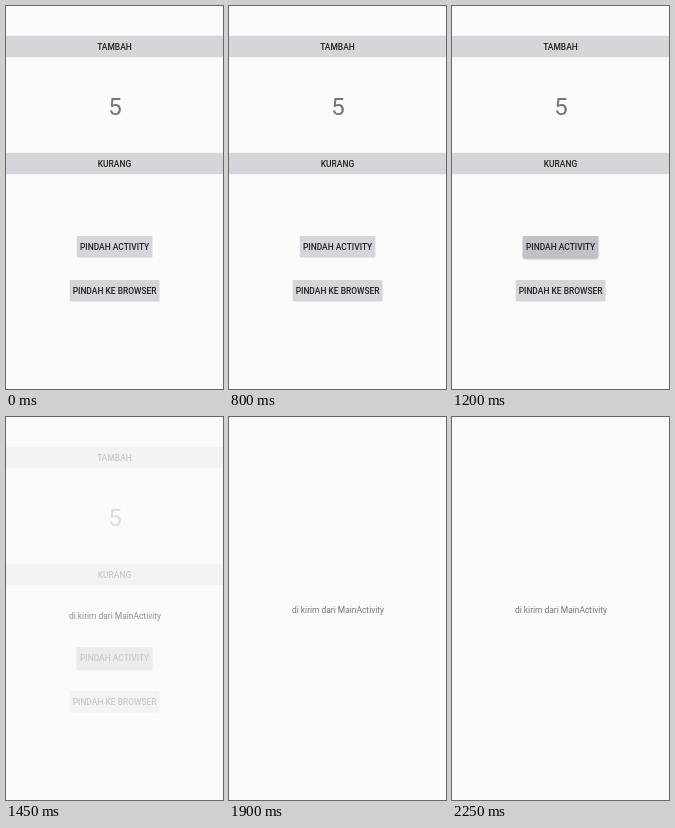
An HTML page for the animation above (2300 ms loop, 217 by 383 pixels).

```html
<!DOCTYPE html>
<html lang="id">
<head>
<meta charset="utf-8">
<title>Counter app</title>
<style>
  html, body { margin: 0; width: 100%; height: 100%; overflow: hidden; background: #fbfbfc; }
  svg { display: block; width: 100vw; height: 100vh; }
  text { font-family: Roboto, "Noto Sans", sans-serif; font-size: 8.44px; text-anchor: middle; fill: #757575; }
  .button rect { fill: #d6d6da; }
  .button text { font-weight: 500; fill: #202020; }
  .count { font-size: 24px; }
</style>
</head>
<body>
<svg viewBox="0 0 217 383">
  <defs>
    <filter id="soft" x="-20%" y="-40%" width="140%" height="200%">
      <feGaussianBlur stdDeviation="1.3"/>
    </filter>
  </defs>
  <rect width="217" height="383" fill="#fbfbfc"/>
  <g id="buttons"></g>
  <text class="count" x="109" y="109">5</text>
  <g id="next" opacity="0">
    <rect width="217" height="383" fill="#fbfbfc"/>
    <text x="109" y="195.8">di kirim dari MainActivity</text>
  </g>
</svg>
<script>
const LOOP = 2300, TICK = 50;
const PRESS = [1100, 1250];
const OPEN = [1350, 1600];
const NS = "http://www.w3.org/2000/svg";

function add(parent, tag, attrs, label) {
  const el = document.createElementNS(NS, tag);
  for (const key in attrs) el.setAttribute(key, attrs[key]);
  if (label) el.textContent = label;
  return parent.appendChild(el);
}

const buttons = document.getElementById("buttons");
const next = document.getElementById("next");
const shadow = add(buttons, "rect", {
  x: 71, y: 232, width: 75, height: 21, rx: 1.2,
  fill: "#000", opacity: 0, filter: "url(#soft)"
});

function button(label, x, y, width) {
  const g = add(buttons, "g", { class: "button" });
  const face = add(g, "rect", { x, y, width, height: 21.5, rx: 1.2 });
  add(g, "text", { x: x + width / 2, y: y + 13.7 }, label);
  return face;
}

button("TAMBAH", 0, 29.8, 217);
button("KURANG", 0, 146.8, 217);
const pressed = button("PINDAH ACTIVITY", 70.8, 230, 75.6);
button("PINDAH KE BROWSER", 63.7, 274, 89.8);

const progress = (t, [from, to]) => Math.min(1, Math.max(0, (t - from) / (to - from)));
const mix = (a, b, p) => Math.round(a + (b - a) * p);

function draw(now) {
  const t = Math.floor((now % LOOP) / TICK) * TICK;
  const press = progress(t, PRESS);
  const open = progress(t, OPEN);
  const ease = 1 - (1 - open) ** 3;

  pressed.style.fill = `rgb(${mix(214, 184, press)},${mix(214, 184, press)},${mix(218, 188, press)})`;
  shadow.setAttribute("opacity", 0.4 * press);
  next.setAttribute("opacity", ease);
  next.setAttribute("transform", `translate(0 ${30 * (1 - ease)})`);
}

const start = performance.now();
function frame() {
  draw(performance.now() - start);
  requestAnimationFrame(frame);
}
frame();
</script>
</body>
</html>
```
